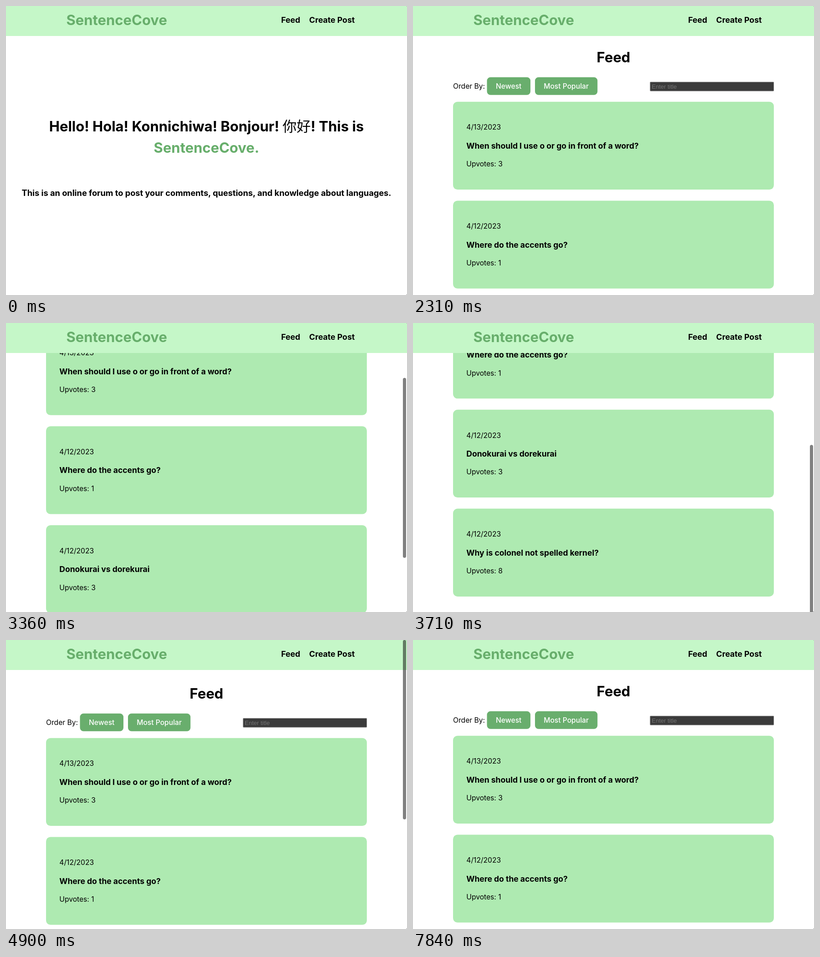
Write an HTML page that moves like this. It is 881x636 px and loops after 8 s.

```html
<!DOCTYPE html>
<html lang="en">
<head>
<meta charset="utf-8">
<title>Language forum</title>
<style>
  html, body { margin: 0; width: 100%; height: 100%; overflow: hidden; background: #333; }
  svg { display: block; width: 881px; height: 636px; background: #fff; border-radius: 0 2px 2px 0; }
  text { font: 400 15.64px Inter, "Noto Sans CJK SC", "Noto Sans CJK", sans-serif; font-optical-sizing: none; }
  .h1 { font-size: 31px; font-weight: 700; }
  .h3 { font-size: 18.22px; font-weight: 700; }
  .nav { font-size: 17.65px; font-weight: 700; }
  .title { font-size: 17.5px; font-weight: 700; }
  .mid { text-anchor: middle; }
  .brand { fill: #67ae6b; }
  .button { fill: #fff; font-weight: 500; }
  .hanzi { font-weight: 500; }
  .hint { fill: #757575; font: 13px "Liberation Sans", Arial, sans-serif; }
</style>
</head>
<body>
<svg viewBox="0 0 881 636">
  <g id="home">
    <text class="h1 mid" x="440.5" y="276.4">Hello! Hola! Konnichiwa! Bonjour! <tspan class="hanzi">你好</tspan>! This is</text>
    <text class="h1 mid brand" x="440.5" y="323.3">SentenceCove.</text>
    <text class="h3 mid" x="440.5" y="417.8">This is an online forum to post your comments, questions, and knowledge about languages.</text>
  </g>
  <g id="feed">
    <text class="h1 mid" x="440.5" y="123.8">Feed</text>
    <text x="88" y="182">Order By:</text>
    <rect x="162.5" y="156.7" width="95.5" height="39" rx="7.8" fill="#69ae6d"/>
    <text class="button mid" x="210.2" y="182">Newest</text>
    <rect x="268" y="156.7" width="137.3" height="39" rx="7.8" fill="#69ae6d"/>
    <text class="button mid" x="336.6" y="182">Most Popular</text>
    <rect x="521" y="167.3" width="271.5" height="19.8" rx="1" fill="#3b3b3b" stroke="#858585"/>
    <text class="hint" x="524.5" y="181.8">Enter title</text>
    <g id="cards"></g>
  </g>
  <rect width="881" height="66" fill="#c5f7c8"/>
  <text class="h1 brand" x="132.4" y="42.4">SentenceCove</text>
  <text class="nav" x="604.4" y="37.4">Feed</text>
  <text class="nav" x="666.1" y="37.4">Create Post</text>
  <rect id="thumb" x="872" width="7" rx="3.5"/>
</svg>
<script>
const LOOP = 8000, STEP = 70;
const HOME_END = 1750, FEED_START = 2310;
const MAX_SCROLL = 440, THUMB_RATIO = 0.6, THUMB_LENGTH = 396;
const [home, feed, cards, thumb] = ['home', 'feed', 'cards', 'thumb'].map(id => document.getElementById(id));

const posts = [
  ['4/13/2023', 'When should I use o or go in front of a word?', 3],
  ['4/12/2023', 'Where do the accents go?', 1],
  ['4/12/2023', 'Donokurai vs dorekurai', 3],
  ['4/12/2023', 'Why is colonel not spelled kernel?', 8]
];
cards.innerHTML = posts.map(([date, title, votes], i) => `
  <g transform="translate(88 ${210.7 + i * 217.8})">
    <rect width="704.8" height="193.3" rx="9.8" fill="#aeeab1"/>
    <text x="29.3" y="61.8">${date}</text>
    <text class="title" x="29.3" y="103">${title}</text>
    <text x="29.3" y="142.6">Upvotes: ${votes}</text>
  </g>`).join('');

// [time, scroll offset]; values past either end are the elastic bounce
const scrollKeys = [
  [2940, 0], [3010, 13], [3150, 64], [3360, 201.2], [3500, 322], [3640, 436],
  [3710, 455.5], [3780, 454], [3920, 446], [4130, 440], [4270, 418], [4410, 339.5],
  [4550, 112], [4620, 8], [4690, -16], [4760, -13], [4900, -5], [5040, -1], [5180, 0]
];

const clamp = (v, lo, hi) => Math.min(hi, Math.max(lo, v));

function interpolate(keys, t) {
  const next = keys.findIndex(([time]) => time > t);
  if (next === 0) return keys[0][1];
  if (next < 0) return keys[keys.length - 1][1];
  const [t0, v0] = keys[next - 1], [t1, v1] = keys[next];
  return v0 + (v1 - v0) * (t - t0) / (t1 - t0);
}

function draw(now) {
  const t = Math.floor(now % LOOP / STEP) * STEP;
  const scroll = interpolate(scrollKeys, t);
  const inside = clamp(scroll, 0, MAX_SCROLL);
  const squeeze = Math.abs(scroll - inside) * 0.27;

  home.style.display = t < HOME_END ? '' : 'none';
  feed.style.display = t >= FEED_START ? '' : 'none';
  feed.setAttribute('transform', `translate(0 ${-scroll})`);
  thumb.setAttribute('y', inside * THUMB_RATIO + (scroll > inside ? squeeze : 0));
  thumb.setAttribute('height', THUMB_LENGTH - squeeze);
  thumb.setAttribute('fill-opacity', t < 3010 ? 0 : 0.5 * clamp((5250 - t) / 210, 0, 1));
  requestAnimationFrame(draw);
}
requestAnimationFrame(draw);
</script>
</body>
</html>
```
